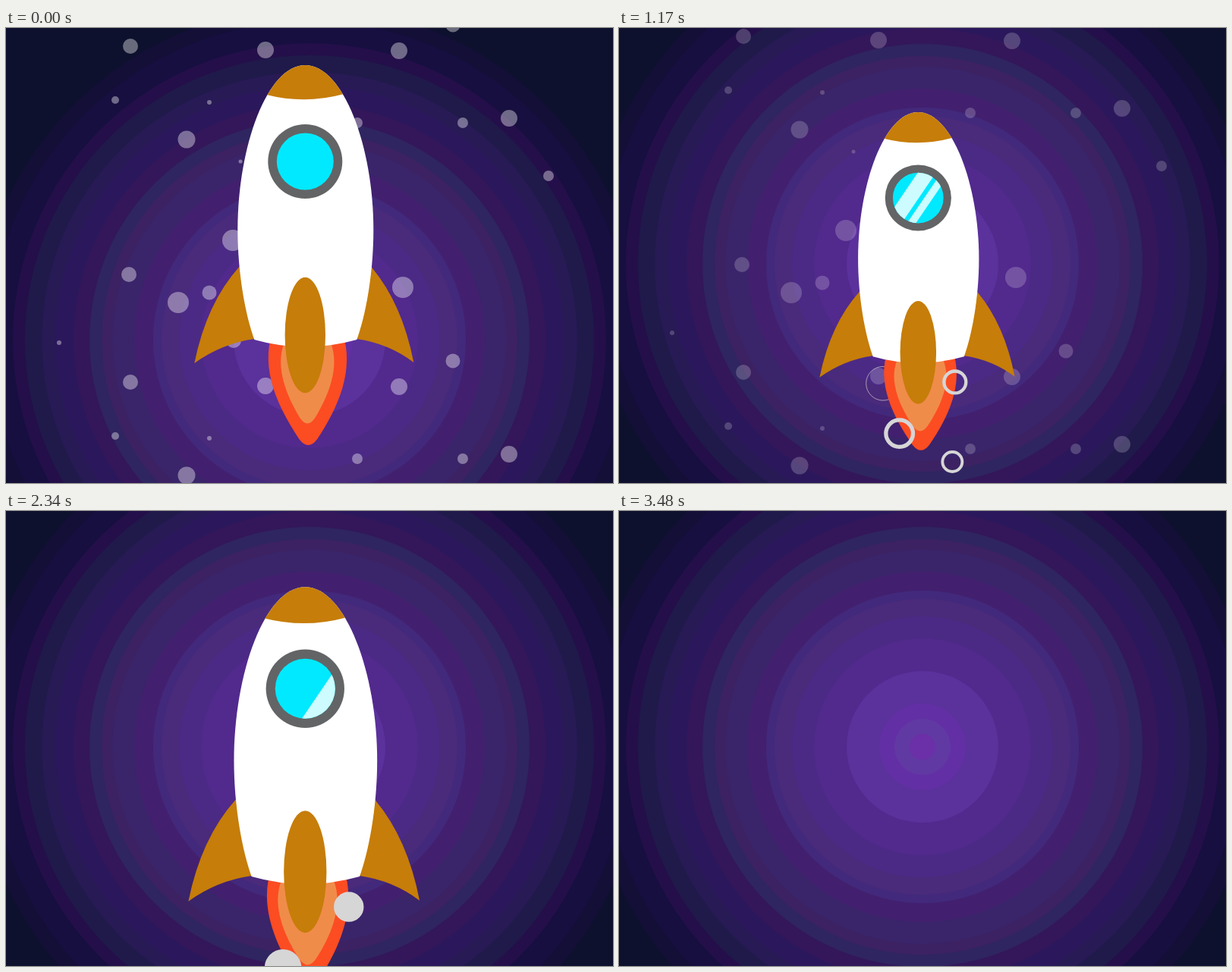
Animation of 800 by 600 pixels, one loop 3.66 s. Source, as an HTML page with a canvas:

```html
<!DOCTYPE html>
<html lang="en">
<head>
<meta charset="utf-8">
<title>Rocket</title>
<style>
  html, body { margin: 0; width: 100%; height: 100%; overflow: hidden; background: #0d112d; }
  canvas { display: block; }
</style>
</head>
<body>
<canvas id="stage" width="800" height="600"></canvas>
<script>
const ctx = document.getElementById('stage').getContext('2d');
const LOOP = 3660, STEP = 30, GONE = 3480, TILE = 443;

// Sky bands, outermost first: [radius, colour]
const bands = [
  [439, '#130f37'], [420, '#160f40'], [391, '#240f4a'], [375, '#1f1a4a'],
  [353, '#281a55'], [335, '#2b185c'], [311, '#33175a'], [290, '#2f2560'],
  [274, '#3c2262'], [260, '#3a246a'], [231, '#42206f'], [206, '#42297c'],
  [195, '#4a2a7a'], [172, '#4b2a86'], [143, '#52298d'], [100, '#5b319c'],
  [57, '#6230a4'], [37, '#6139a3'], [17, '#6b2fa8']
];

// One vertical tile of stars: [x, y, radius]
const stars = [
  [164, 24, 10], [342, 29, 11], [518, 30, 11], [589, 439, 9.5], [144, 95, 5],
  [268, 98, 3], [463, 125, 7], [602, 125, 7], [663, 119, 11], [715, 195, 7],
  [238, 147, 11.5], [309, 176, 2.5], [299, 280, 14], [162, 325, 10],
  [227, 362, 14], [268, 349, 9.5], [523, 342, 14], [70, 415, 3],
  [300, 412, 10], [342, 220, 5], [382, 216, 7.5], [422, 280, 14],
  [464, 274, 2.5], [445, 349, 9]
];

// Smoke puffs, relative to the porthole
const backPuff = { x: -52, y: 275, r: 25.5, starts: [450, 1500] };
const frontStarts = [489, 1190, 2009, 2668];
const frontPuffs = [
  { x: 54.5, y: 273, r: 18.7, starts: frontStarts },
  { x: -27.7, y: 349, r: 23, starts: frontStarts },
  { x: 50.6, y: 391, r: 16.8, starts: frontStarts }
];

// Keyframe tracks: [time, value]
const tracks = {
  sky: [[0, 411], [540, 311]],
  scroll: [[0, 0], [540, 300], [1170, 430], [1650, 450]],
  starAlpha: [[0, .38], [700, .38], [1170, .2], [1630, 0]],
  y: [[0, 176], [540, 314], [1170, 224], [1950, 239.5], [2160, 214.5], [2730, 298], [3240, 43], [3480, -480]],
  scale: [[0, 1], [540, 1.078], [1170, .89], [1920, 1.188], [2160, 1.083], [2730, 1.031], [3240, 1.243], [3480, 1.1]],
  flame: [[0, 1], [540, .92], [1170, 1.04], [1950, 1.11], [2730, .86], [3240, 1.04], [3480, 1]],
  core: [[0, 1], [540, .92], [1170, 1.1], [1950, 1.2], [2730, .91], [3240, 1], [3480, 1]],
  shine: [[750, -80], [1050, 0], [2120, 0], [2450, 80]]
};

const shapes = {
  body: 'M0-127C-50-127-89-20-89 90C-89 150-78 205-67 235Q0 254 68 235C79 205 90 150 90 90C90-20 50-127 0-127Z',
  noseCap: 'M-100-140H100V-104Q75-96 51-89Q0-75-51-88Q-75-96-100-104Z',
  fins: 'M-80 130L-87 139Q-130 187-146 266Q-110 240-67 234ZM80 130L88 140Q128 188 143 265Q110 240 68 234Z',
  flame: 'M-43 225C-60 275-35 325-8 366Q4 382 16 366C43 325 66 275 49 225Z',
  core: 'M-28 240C-40 272-24 310-7 338Q3 353 13 338C30 310 46 272 34 240Z'
};
for (const name in shapes) shapes[name] = new Path2D(shapes[name]);

// Smooth interpolation that rests at turning points
function at(keys, t) {
  const last = keys.length - 1;
  if (t <= keys[0][0]) return keys[0][1];
  if (t >= keys[last][0]) return keys[last][1];
  const slope = i => (keys[i + 1][1] - keys[i][1]) / (keys[i + 1][0] - keys[i][0]);
  const tangent = i => {
    if (i === 0) return slope(0);
    if (i === last) return slope(last - 1);
    const a = slope(i - 1), b = slope(i);
    return a * b <= 0 ? 0 : (keys[i + 1][1] - keys[i - 1][1]) / (keys[i + 1][0] - keys[i - 1][0]);
  };
  let i = 0;
  while (t > keys[i + 1][0]) i++;
  const span = keys[i + 1][0] - keys[i][0], u = (t - keys[i][0]) / span, v = 1 - u;
  return v * v * (1 + 2 * u) * keys[i][1] + u * u * (3 - 2 * u) * keys[i + 1][1]
    + span * u * v * (v * tangent(i) - u * tangent(i + 1));
}

const clamp = v => Math.max(0, Math.min(1, v));

function oval(x, y, rx, ry, fill) {
  ctx.beginPath();
  ctx.ellipse(x, y, rx, ry, 0, 0, Math.PI * 2);
  ctx.fillStyle = fill;
  ctx.fill();
}
const disc = (x, y, r, fill) => oval(x, y, r, r, fill);

function shape(name, fill) {
  ctx.fillStyle = fill;
  ctx.fill(shapes[name]);
}

function drawSky(t) {
  ctx.fillStyle = '#0d112d';
  ctx.fillRect(0, 0, 800, 600);
  const y = at(tracks.sky, t);
  for (const [r, colour] of bands) disc(400, y, r, colour);
}

function drawStars(t) {
  const alpha = at(tracks.starAlpha, t), scroll = at(tracks.scroll, t);
  if (alpha <= 0) return;
  for (const [x, y, r] of stars) {
    const top = (y + scroll) % TILE - TILE;
    for (let k = 0; k < 3; k++) disc(x, top + k * TILE, r, `rgba(255,255,255,${alpha})`);
  }
}

// A puff fades in, then a hole opens until nothing is left
function drawPuff({ x, y, r, starts }, t) {
  for (const start of starts) {
    const life = t - start, hole = clamp((life - 555) / 170);
    if (life <= 0 || hole >= 1) continue;
    ctx.globalAlpha = clamp(life / 130);
    ctx.beginPath();
    ctx.arc(x, y, r * (1 + hole) / 2, 0, Math.PI * 2);
    ctx.lineWidth = r * (1 - hole);
    ctx.strokeStyle = '#d6d6d6';
    ctx.stroke();
    ctx.globalAlpha = 1;
  }
}

function drawFlame(name, fill, stretch) {
  ctx.save();
  ctx.translate(3, 0);
  ctx.scale(stretch, 1);
  ctx.translate(-3, 0);
  shape(name, fill);
  ctx.restore();
}

function drawPorthole(t) {
  disc(0, 0, 49, '#636466');
  disc(0, 0, 37.5, '#00e9ff');
  const shift = at(tracks.shine, t);
  ctx.save();
  ctx.clip();
  ctx.transform(1, 0, -.68, 1, shift, 0);
  ctx.fillStyle = '#ccfcff';
  ctx.fillRect(-26, -40, 27, 80);
  ctx.fillRect(9, -40, 13, 80);
  ctx.restore();
}

function drawRocket(t) {
  const scale = at(tracks.scale, t);
  ctx.save();
  ctx.translate(394.3, at(tracks.y, t));
  ctx.scale(scale, scale);
  drawPuff(backPuff, t);
  drawFlame('flame', '#fc4c22', at(tracks.flame, t));
  drawFlame('core', '#f08c4a', at(tracks.core, t));
  for (const puff of frontPuffs) drawPuff(puff, t);
  shape('fins', '#c67d09');
  shape('body', '#fff');
  ctx.save();
  ctx.clip(shapes.body);
  shape('noseCap', '#c67d09');
  ctx.restore();
  oval(0, 229, 26.7, 76.3, '#c67d09');
  drawPorthole(t);
  ctx.restore();
}

function frame() {
  const t = Math.floor(performance.now() % LOOP / STEP) * STEP;
  drawSky(t);
  drawStars(t);
  if (t < GONE) drawRocket(t);
  requestAnimationFrame(frame);
}
frame();
</script>
</body>
</html>
```
